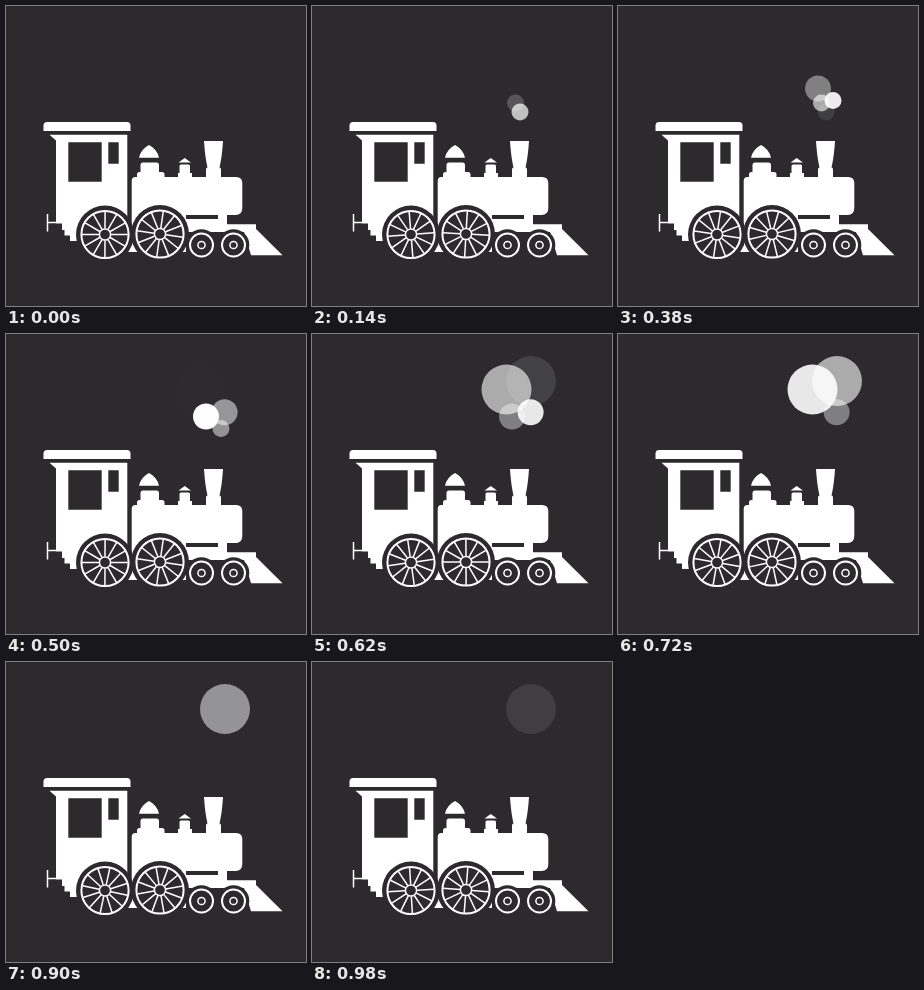
Recreate the animation shown at these times as an HTML page. Size 300 by 300 pixels, loop 1 s.

```html
<!DOCTYPE html>
<html lang="en">
<head>
<meta charset="utf-8">
<title>Steam train</title>
<style>
  html, body { margin: 0; width: 100%; height: 100%; overflow: hidden; background: #2c2a2d; }
  svg { display: block; width: 100vw; height: 100vh; }
  .gap { fill: #2c2a2d; }
  .line { fill: none; stroke: #fff; stroke-width: 2; }
  .thin { fill: none; stroke: #fff; stroke-width: 1.5; }
</style>
</head>
<body>
<svg viewBox="0 0 300 300" fill="#fff">
  <!-- cab -->
  <path d="M37.500 125V119.500Q37.500 116 41 116H121Q124.500 116 124.500 119.500V125Z"/>
  <path fill-rule="evenodd" d="M43.500 128.700H121.300V235H64V229.500H58.500V224H56V217.500H50V134.500ZM62.300 136.300V175.700H95.700V136.300ZM102.300 136.300V157.700H112.700V136.300Z"/>
  <path class="thin" d="M41.500 208V225.500M41.500 216.500H50"/>
  <!-- boiler and frame -->
  <path d="M125.700 175Q125.700 171 129.500 171H131V168.500Q131 166 133.500 166H156Q158.500 166 158.500 168.500V171H230Q236.300 171 236.300 177V202Q236.300 209 229.500 209H221V218.300H250V223L276.500 249.300H245L238 226H178V213H212V209H180V246H121V230H125.700Z"/>
  <!-- domes and chimney -->
  <path d="M133 151.700Q135 143 143 139Q151 143 153 151.700ZM134.500 167V159Q134.500 156.500 137 156.500H150.500Q153 156.500 153 159V167Z"/>
  <path d="M172.500 156.500L178.700 152L185 156.500ZM173.500 167V160Q173.500 158.500 175 158.500H182.500Q184 158.500 184 160V167H186V172H172V167Z"/>
  <path d="M198 135H217Q216 151 213.500 161.500Q215 161.500 215 163.500V172H200V163.500Q200 161.500 201.500 161.500Q199 151 198 135Z"/>
  <g id="wheels"></g>
  <g id="smoke"></g>
</svg>
<script>
  const LOOP = 1000;
  const TURN = 180;
  const wheels = document.getElementById('wheels');
  const smoke = document.getElementById('smoke');
  const circle = (x, y, r, cls = '') => `<circle cx="${x}" cy="${y}" r="${r}" class="${cls}"/>`;

  // x, y, starting angle
  const bigWheels = [[99, 228.5, 0], [154, 228, 8]];
  const smallWheels = [[195.5, 239], [227.5, 239]];
  const puffs = [
    [208, 106, 8.5], [203.5, 97, 8.5], [215, 94.5, 8.5],
    [200, 82.5, 13], [218.6, 78.2, 13], [194.5, 55.5, 25], [219, 47, 25]
  ];

  const spokes = Array.from({ length: 12 }, (_, i) =>
    `<path class="thin" d="M0 6V23" transform="rotate(${i * 30})"/>`).join('');

  wheels.innerHTML =
    bigWheels.map(([x, y]) => circle(x, y, 29, 'gap')).join('') +
    smallWheels.map(([x, y]) => circle(x, y, 15.8, 'gap')).join('') +
    bigWheels.map(([x, y]) => `<g transform="translate(${x} ${y})">` +
      circle(0, 0, 23.6, 'line') + circle(0, 0, 5.6, 'thin') +
      `<g class="spin">${spokes}</g></g>`).join('') +
    smallWheels.map(([x, y]) =>
      circle(x, y, 11.5, 'line') + circle(x, y, 3.6, 'thin')).join('');
  smoke.innerHTML = puffs.map(p => circle(...p)).join('');

  const spinners = document.querySelectorAll('.spin');

  function draw(now) {
    const t = now % LOOP;
    spinners.forEach((s, i) =>
      s.setAttribute('transform', `rotate(${bigWheels[i][2] + TURN * t / LOOP})`));
    // each puff starts 100 ms after the last, fading in and out over 200 ms each way
    [...smoke.children].forEach((puff, i) => {
      puff.setAttribute('opacity', Math.max(0, 1 - Math.abs(t - 200 - i * 100) / 200));
    });
  }

  const start = performance.now();
  function tick() {
    draw(performance.now() - start);
    requestAnimationFrame(tick);
  }
  tick();
</script>
</body>
</html>
```
